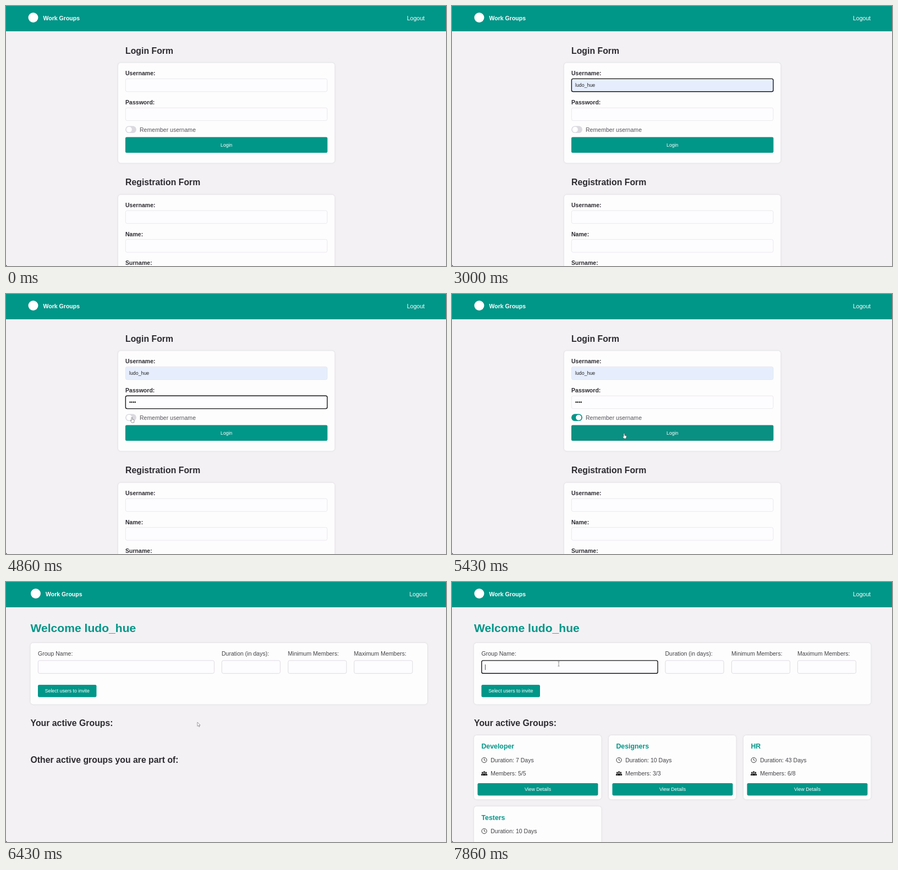
Animation, 800 px wide and 473 px high, one loop 8000 ms. Source, as an HTML page:

```html
<!DOCTYPE html>
<html lang="en">
<head>
<meta charset="utf-8">
<title>Work Groups</title>
<style>
html, body { margin: 0; height: 100%; overflow: hidden; background: #f3f1f4; }
svg { display: block; width: 100vw; height: 100vh; font-family: "Liberation Sans", Arial, sans-serif; }
.card { filter: drop-shadow(0 .7px 1.6px #0002); }
</style>
</head>
<body>
<svg id="stage" viewBox="0 0 800 473"></svg>
<script>
const LOOP = 8000, RATE = 7;
const TEAL = '#009688', INK = '#2d2b30', USER = 'ludo_hue';
const stage = document.getElementById('stage');

const text = (x, y, s, size = 10.56, fill = '#414044', more = '') =>
  `<text x="${x}" y="${y}" font-size="${size}" fill="${fill}" ${more}>${s}</text>`;
const bold = (x, y, s, size = 10.56, fill = INK) => text(x, y, s, size, fill, 'font-weight="700"');
const rect = (x, y, w, h, r, fill, more = '') =>
  `<rect x="${x}" y="${y}" width="${w}" height="${h}" rx="${r}" fill="${fill}" ${more}/>`;
const card = (x, y, w, h) => rect(x, y, w, h, 5, '#fefdfe', 'class="card"');
const button = (x, y, w, h, s, fill = TEAL) => rect(x, y, w, h, 2.3, fill) +
  text(x + w / 2, y + h / 2 + 3.1, s, 8.8, '#fff', 'text-anchor="middle"');
const caret = (x, y, fill) => rect(x, y - 5, .8, 10, 0, fill);

function input(x, y, w, { focus, fill = '#fdfcfe', line = '#e5e3e9' } = {}) {
  const edge = focus ? 'stroke="#141416" stroke-width="1.4"' : `stroke="${line}" stroke-width=".8"`;
  return rect(x + .4, y + .4, w - .8, 23.4, 2.8, fill, edge);
}

const header = dx => rect(0, 0, 800, 46, 0, TEAL) +
  `<circle cx="${49.5 + dx}" cy="21" r="9" fill="#fff"/>` +
  bold(67.5 + dx, 26.3, 'Work Groups', 10.56, '#fff') +
  text(729 + dx, 26.3, 'Logout', 10.56, '#fff');

function mix(k) {
  const a = [0, 150, 136], b = [17, 137, 123];
  return `rgb(${a.map((v, i) => Math.round(v + (b[i] - v) * k))})`;
}
const clamp = v => Math.max(0, Math.min(1, v));

function loginPage(n) {
  const filled = n >= 21, userFocus = n >= 9 && n < 26, passFocus = n >= 26 && n < 35;
  const dots = n < 28 ? 0 : Math.min(4, n - 27 + (n > 29));
  const on = clamp((n - 34) / 2);
  let s = header(0) + bold(217, 86.7, 'Login Form', 15.84) + card(204, 103.5, 393.5, 182);
  s += bold(217, 126, 'Username:') + input(217, 132, 367.5, { focus: userFocus, fill: filled ? '#e6eefd' : '#fdfcfe' });
  s += bold(217, 179, 'Password:') + input(217, 184.8, 367.5, { focus: passFocus });
  if (filled) s += text(224, 147, USER, 8.8, '#222');
  else if (n === 9) s += caret(224, 144, '#c4c3c7');
  else if (userFocus && (n - 10) % 8 < 4) s += caret(224, 144, '#333');
  s += text(224, 200, '•'.repeat(dots), 8.8, '#111');
  if (passFocus && n < 32) s += caret(224 + dots * 3.08, 196.8, n < 28 ? '#c4c3c7' : '#333');
  s += rect(217, 218.3, 20, 12.8, 6.4, on ? TEAL : '#dcdae0') +
    `<circle cx="${223.8 + 6.4 * on}" cy="224.7" r="5" fill="#fff"/>` +
    text(243, 228.6, 'Remember username', 10.56, '#555358');
  s += button(217, 238.5, 367.5, 28.5, 'Login', mix(clamp((n - 36) / 4)));
  s += bold(217, 326.3, 'Registration Form', 15.84) + card(204, 343.5, 393.5, 160);
  ['Username:', 'Name:', 'Surname:'].forEach((label, i) => {
    s += bold(217, 366 + i * 52.5, label) + input(217, 371.8 + i * 52.5, 367.5);
  });
  return s;
}

const clock = (x, y) => `<g fill="none" stroke="#222" stroke-width=".9">
  <circle cx="${x}" cy="${y}" r="4.6"/><path d="M${x} ${y - 3}v3l2 1.4"/></g>`;
const person = (x, y, k) => `<circle cx="${x}" cy="${y - 2.3 * k}" r="${1.8 * k}"/>
  <path d="M${x - 3 * k} ${y + 4 * k}v${-2 * k}q0-${2.3 * k} ${3 * k}-${2.3 * k}t${3 * k} ${2.3 * k}v${2 * k}z"/>`;
const people = (x, y) => `<g fill="#171717">${person(x - 3.2, y + .6, .78)}${person(x + 3.2, y + .6, .78)}
  <g stroke="#fff" stroke-width=".4">${person(x, y, 1)}</g></g>`;

function group(i, name, days, members) {
  const x = 40 + i % 3 * 245, y = 279 + (i > 2 ? 129.2 : 0);
  return card(x, y, 231.5, 116.5) + bold(x + 13.4, y + 24.4, name, 12.36, TEAL) +
    clock(x + 18.6, y + 45) + text(x + 30.2, y + 48.8, `Duration: ${days} Days`) +
    people(x + 18.6, y + 69.2) + text(x + 30.2, y + 72.8, `Members: ${members}`) +
    button(x + 6.5, y + 87, 219, 22.4, 'View Details');
}

function homePage(n) {
  const loaded = n >= 46, dx = loaded ? 0 : 4.5, focus = n >= 53;
  let s = bold(40, 91.4, 'Welcome ' + USER, 21.1, TEAL) + card(40, 111, 721.5, 111.5);
  [['Group Name:', 53.5, 321], ['Duration (in days):', 387.5, 107],
   ['Minimum Members:', 508, 107], ['Maximum Members:', 628, 107]].forEach(([label, x, w], i) => {
    s += text(x, 133.6, label) + input(x, 142.5, w, { focus: focus && !i, line: '#d4d2d9' });
  });
  if (focus) s += caret(60, 155, '#222');
  s += button(53.5, 187, 106.5, 22.4, 'Select users to invite') + bold(40, 262, 'Your active Groups:', 15.84);
  s += loaded
    ? group(0, 'Developer', 7, '5/5') + group(1, 'Designers', 10, '3/3') +
      group(2, 'HR', 43, '6/8') + group(3, 'Testers', 10, '4/5')
    : bold(40, 328.8, 'Other active groups you are part of:', 15.84);
  return header(dx) + `<g transform="translate(${dx})">${s}</g>`;
}

// pointer stops: step, x, y
const PATH = [[25, 285, 176], [26, 256, 199], [32, 256, 199], [34, 229, 225], [36, 232, 226],
  [38, 313, 254], [42, 349, 255], [48, 349, 255], [53, 194, 149], [56, 194, 149]];
const SHAPES = {
  beam: '<path d="M-1.6-4H1.6M-1.6 4H1.6M0-4V4" fill="none" stroke="#77757a" stroke-width=".8"/>',
  arrow: '<path d="M-1 0V7.4L.7 5.9 2 8.6 3.2 8 2 5.5H4.2z" fill="#fff" stroke="#77757a" stroke-width=".7"/>',
  hand: '<path d="M-1 0Q0-1.2 .9 0V3.2L3.6 4Q4.4 4.3 4.2 5.4L3.5 9H-.4L-2.8 5.6Q-2.5 4.5-1 5.6z" fill="#fff" stroke="#333" stroke-width=".5"/>'
};

function pointer(n) {
  if (n < PATH[0][0]) return '';
  const i = PATH.findIndex(p => p[0] > n), a = PATH[i - 1], b = PATH[i];
  const k = (n - a[0]) / (b[0] - a[0]), e = k * k * (3 - 2 * k);
  const x = a[1] + (b[1] - a[1]) * e, y = a[2] + (b[2] - a[2]) * e;
  const shape = n < 33 || n >= 52 ? 'beam' : n < 44 ? 'hand' : 'arrow';
  return `<g transform="translate(${x} ${y})">${SHAPES[shape]}</g>`;
}

let last = -1;
function draw(now) {
  const n = Math.floor(now % LOOP * RATE / 1000);
  if (n !== last) {
    last = n;
    stage.innerHTML = rect(0, 0, 800, 473, 0, '#f3f1f4') + (n < 44 ? loginPage(n) : homePage(n)) +
      pointer(n) + '<path d="M0 470.5Q.3 472.7 2.5 473H0z" fill="#222"/>';
  }
  requestAnimationFrame(draw);
}
draw(performance.now());
</script>
</body>
</html>
```
